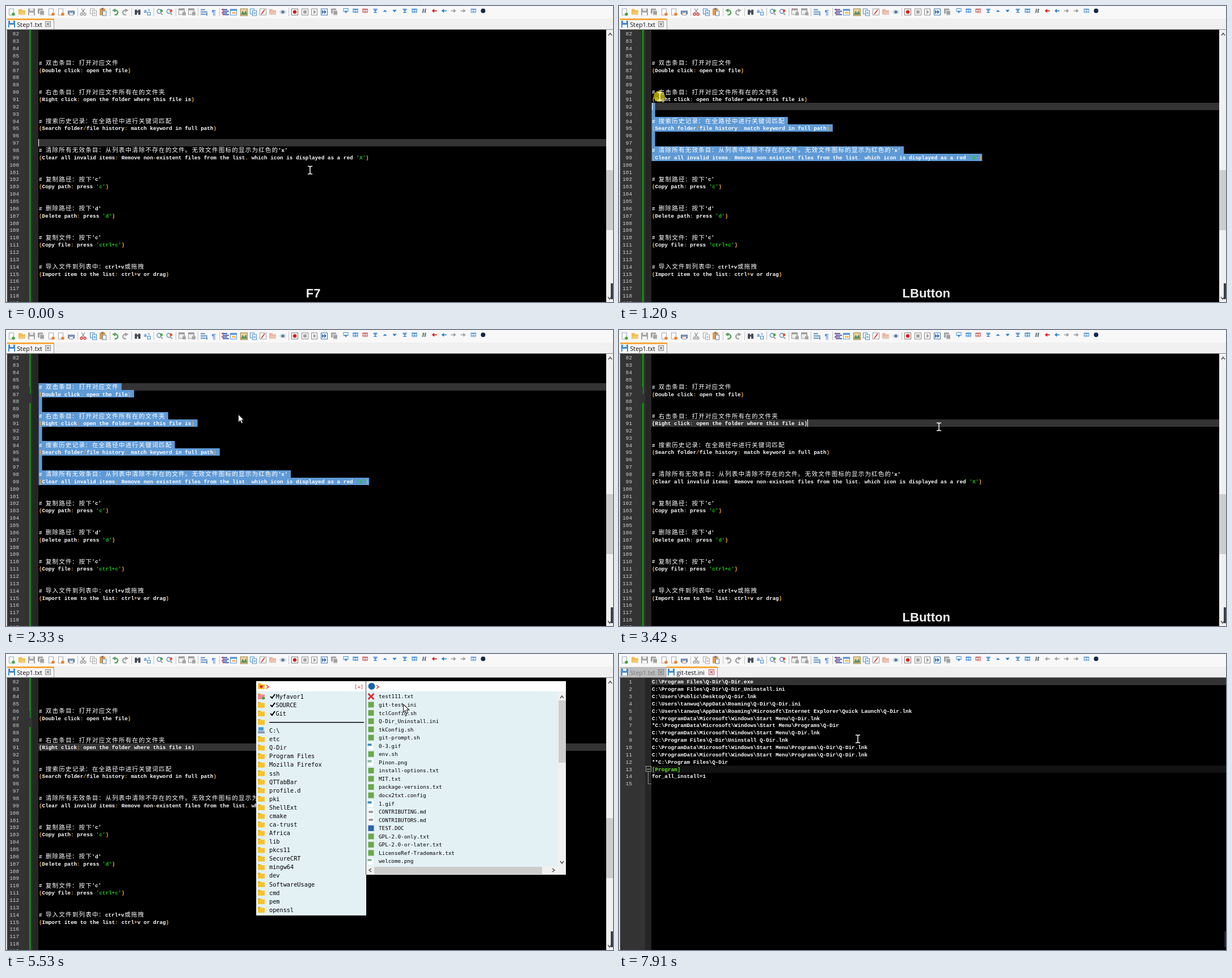
Write an HTML page with a canvas that moves like this. It is 1070 px wide and 523 px high and loops after 8000 ms.

```html
<!DOCTYPE html>
<html lang="en">
<head>
<meta charset="utf-8">
<title>Editor session</title>
<style>
html, body { margin: 0; width: 100%; height: 100%; overflow: hidden; background: #000; }
canvas { display: block; width: 1070px; height: 523px; }
</style>
</head>
<body>
<canvas id="stage" width="1070" height="523"></canvas>
<script>
const ctx = document.getElementById('stage').getContext('2d');
const LOOP = 8000, LEFT = 58, CHAR = 5.593, WIDE = 11.73, PITCH = 12.86;
const MONO = '9.32px "Liberation Mono", monospace';
const CJK = '500 10.6px "Noto Sans CJK SC", "Noto Sans CJK", sans-serif';
const UI = '"Open Sans", "Noto Sans", sans-serif';

const pairs = [
  ['# 双击条目：打开对应文件', '(Double click: open the file)'],
  ['# 右击条目：打开对应文件所有在的文件夹', '(Right click: open the folder where this file is)'],
  ['# 搜索历史记录：在全路径中进行关键词匹配', '(Search folder/file history: match keyword in full path)'],
  ["# 清除所有无效条目：从列表中清除不存在的文件。无效文件图标的显示为红色的'x'",
   "(Clear all invalid items: Remove non-existent files from the list. which icon is displayed as a red 'X')"],
  ["# 复制路径：按下'c'", "(Copy path: press 'c')"],
  ["# 删除路径：按下'd'", "(Delete path: press 'd')"],
  ["# 复制文件：按下'c'", "(Copy file: press 'ctrl+c')"],
  ['# 导入文件到列表中：ctrl+v或拖拽', '(Import item to the list: ctrl+v or drag)']
];
const notes = {};
pairs.forEach((pair, i) => pair.forEach((s, j) => { notes[86 + 4 * i + j] = s; }));

const menu = 'C:\\ProgramData\\Microsoft\\Windows\\Start Menu\\', home = 'C:\\Users\\tanwuq\\AppData\\Roaming\\';
const ini = [
  'C:\\Program Files\\Q-Dir\\Q-Dir.exe', 'C:\\Program Files\\Q-Dir\\Q-Dir_Uninstall.ini',
  'C:\\Users\\Public\\Desktop\\Q-Dir.lnk', home + 'Q-Dir\\Q-Dir.ini',
  home + 'Microsoft\\Internet Explorer\\Quick Launch\\Q-Dir.lnk', menu + 'Q-Dir.lnk',
  '*' + menu + 'Programs\\Q-Dir', menu + 'Q-Dir.lnk', '*C:\\Program Files\\Q-Dir\\Uninstall Q-Dir.lnk',
  menu + 'Programs\\Q-Dir\\Q-Dir.lnk', menu + 'Programs\\Q-Dir\\Q-Dir.lnk',
  '**C:\\Program Files\\Q-Dir', '[Program]', 'for_all_install=1', ''
];
const folders = ('Myfavor1|SOURCE|Git||C:\\|etc|Q-Dir|Program Files|Mozilla Firefox|ssh|QTTabBar|profile.d|pki|ShellExt|' +
  'cmake|ca-trust|Africa|lib|pkcs11|SecureCRT|mingw64|dev|SoftwareUsage|cmd|pem|openssl').split('|');
const files = ('test111.txt|git-test.ini|tclConfig.sh|Q-Dir_Uninstall.ini|tkConfig.sh|git-prompt.sh|0-3.gif|env.sh|Pinon.png|' +
  'install-options.txt|MIT.txt|package-versions.txt|docx2txt.config|1.gif|CONTRIBUTING.md|CONTRIBUTORS.md|TEST.DOC|' +
  'GPL-2.0-only.txt|GPL-2.0-or-later.txt|LicenseRef-Trademark.txt|welcome.png').split('|');

// time, x, y of the pointer
const path = [
  [70, 536, 290], [300, 640, 276], [520, 686, 268], [740, 650, 267], [820, 640, 267], [1000, 330, 215],
  [1130, 120, 177], [1200, 72, 160], [1470, 49, 99], [2000, 49, 99], [2330, 409, 149], [2560, 555, 172],
  [2680, 564, 171], [3600, 564, 171], [4020, 562, 128], [4700, 562, 128], [5150, 718, 95],
  [5450, 700, 86], [5590, 701, 91], [7230, 701, 91], [7360, 650, 98], [7500, 590, 108], [7850, 421, 150]
];
const labels = [
  [0, 'F7'], [740, 'LButton'], [1800, ''], [3220, 'LButton'], [3950, 'Ctrl + Alt + Space'],
  [5000, ''], [5880, 'LButton'], [5990, 'Double-Click'], [7030, '']
];

const within = (t, a, b) => t >= a && t < b;
const isWide = c => c >= '\u3000';
const widthOf = s => [...s].reduce((w, c) => w + (isWide(c) ? WIDE : CHAR), 0);

function rect(x, y, w, h, color) { ctx.fillStyle = color; ctx.fillRect(x, y, w, h); }
function frame(x, y, w, h, color, fill) {
  if (fill) rect(x, y, w, h, fill);
  ctx.strokeStyle = color; ctx.lineWidth = 1;
  ctx.strokeRect(x + .5, y + .5, w - 1, h - 1);
}
function line(color, width, ...p) {
  ctx.strokeStyle = color; ctx.lineWidth = width;
  ctx.beginPath();
  for (let i = 0; i < p.length; i += 2) ctx.lineTo(p[i], p[i + 1]);
  ctx.stroke();
}
function shape(color, ...p) {
  ctx.fillStyle = color;
  ctx.beginPath();
  for (let i = 0; i < p.length; i += 2) ctx.lineTo(p[i], p[i + 1]);
  ctx.closePath(); ctx.fill();
}
function disc(x, y, r, color) {
  ctx.fillStyle = color; ctx.beginPath(); ctx.arc(x, y, r, 0, 7); ctx.fill();
}
function ring(x, y, r, color, width = 1, from = 0, to = 7) {
  ctx.strokeStyle = color; ctx.lineWidth = width;
  ctx.beginPath(); ctx.arc(x, y, r, from, to); ctx.stroke();
}
function text(s, x, y, font, color, align = 'left') {
  ctx.font = font; ctx.fillStyle = color; ctx.textAlign = align; ctx.fillText(s, x, y);
}
function chevron(x, y, dx, dy, color = '#505050') {
  line(color, 1.5, x - 3 * dy - 2 * dx, y - 3 * dx - 2 * dy, x + 2 * dx, y + 2 * dy, x + 3 * dy - 2 * dx, y + 3 * dx - 2 * dy);
}

function pointerAt(t) {
  const i = path.findIndex(p => p[0] > t);
  if (i < 0) return path[path.length - 1].slice(1);
  if (i === 0) return path[0].slice(1);
  const [t0, x0, y0] = path[i - 1], [t1, x1, y1] = path[i], k = (t - t0) / (t1 - t0);
  return [x0 + (x1 - x0) * k, y0 + (y1 - y0) * k];
}

// Toolbar glyphs, drawn around (0, 0)
const glyph = {
  page(c) { frame(-5, -6, 9, 12, '#9aa6b2', '#fff'); disc(3, 4, 2.8, c); },
  folder(c) { rect(-6, -5, 6, 3, c); rect(-6, -3, 12, 8, c); shape('#fff3', -6, 5, -3, 0, 7, 0, 5, 5); },
  disk(c) { rect(-6, -6, 12, 12, c); rect(-3, -6, 6, 4, '#e8eef4'); rect(-4, 1, 8, 5, '#fff'); },
  disks(c) { rect(-6, -6, 9, 9, c); frame(-3, -3, 9, 9, '#fff', c); },
  print(c) { rect(-4, -6, 8, 5, '#fff'); frame(-6, -2, 12, 6, '#668', c); frame(-4, 1, 8, 5, '#889', '#fff'); },
  cut(c) { line('#889', 1.3, -3, -6, 3, 3); line('#889', 1.3, 3, -6, -3, 3); ring(-3, 4, 2, c, 1.5); ring(3, 4, 2, c, 1.5); },
  copy(c) { frame(-6, -6, 8, 10, c, '#fff'); frame(-2, -3, 8, 10, c, '#fff'); line(c, 1, 0, 1, 4, 1); line(c, 1, 0, 3, 4, 3); },
  paste(c) { rect(-6, -6, 10, 12, c); rect(-3, -7, 4, 3, '#777'); frame(-1, -2, 7, 9, '#5580b0', '#fff'); },
  undo(c) { ring(0, 1, 4, c, 2.4, -1.7, 2); shape(c, -6, -3, 0, -6, 0, 1); },
  redo(c) { ctx.scale(-1, 1); glyph.undo(c); },
  find(c) { rect(-5, -4, 4, 9, c); rect(1, -4, 4, 9, c); rect(-2, -2, 4, 3, c); },
  swap(c) { text('a', -6, 1, 'bold 9px "Liberation Sans", sans-serif', c); frame(0, 0, 6, 6, c); line(c, 1.3, 2, -5, 4, -2); },
  zoom(c) { ring(-1, -1, 3.6, '#6a9cc4', 1.6); line('#a98', 2, 2, 2, 5, 5); disc(3, -2, 2.4, c); },
  lock(c) { frame(-6, -6, 11, 11, '#999', '#f0f0f0'); rect(-6, -6, 11, 3, '#999'); rect(1, 1, 6, 5, c); ring(4, 1, 2, c); },
  wrap(c) { for (const y of [-4, 0, 4]) rect(-6, y - 1, y ? 8 : 12, 2, c); shape(c, 2, 4, 6, 1, 6, 7); },
  mark(c) { text('¶', 0, 5, 'bold 13px "Liberation Sans", sans-serif', c, 'center'); },
  indent(c) { for (const y of [-5, -2, 1, 4]) rect(y % 2 ? -5 : -2, y, 10, 1.6, c); rect(-3, -6, 1, 12, '#d44'); },
  tile(c) { frame(-6, -5, 12, 11, c, '#fff'); rect(-6, -5, 12, 3, c); rect(-3, 0, 7, 3, '#ffb84a'); },
  map(c) { frame(-6, -6, 13, 13, '#a88040', '#e8d8a0'); shape(c, -5, 5, -2, -2, 1, 2, 4, -3, 6, 5); },
  func(c) { frame(-6, -6, 12, 12, '#999', '#fff'); line(c, 2, -3, 4, 3, -4); },
  eye(c) { ctx.beginPath(); ctx.ellipse(0, 0, 6, 4, 0, 0, 7); ctx.fillStyle = '#cde'; ctx.fill(); disc(0, 0, 2.6, c); },
  rec(c) { frame(-6, -6, 12, 12, '#777', '#fff'); disc(0, 0, 3.3, c); },
  stop(c) { frame(-6, -6, 12, 12, '#888', '#fff'); rect(-3, -3, 6, 6, c); },
  play(c) { frame(-6, -6, 11, 12, '#888', '#fff'); shape(c, -2, -4, 3, 0, -2, 4); },
  fast(c) { frame(-6, -6, 12, 12, c, '#fff'); shape(c, -4, -4, 0, 0, -4, 4); shape(c, 0, -4, 4, 0, 0, 4); },
  grid(c) { frame(-5, -4, 10, 8, c, '#fff'); rect(-5, -4, 10, 2, c); line(c, 1, 0, -2, 0, 4); line(c, 1, -5, 1, 5, 1); },
  pin(c) { frame(-5, -5, 10, 7, c, '#fff'); shape(c, -3, 0, 3, 0, 0, 5); },
  up(c) { shape(c, -4, 2, 4, 2, 0, -2); },
  down(c) { shape(c, -4, -2, 4, -2, 0, 3); },
  both(c) { rect(-4, -4, 8, 1.5, c); shape(c, -4, -2, 4, -2, 0, 1); shape(c, -4, 4, 4, 4, 0, 1); },
  head(c) { text('H', 0, 4, 'italic bold 11px "Liberation Serif", serif', c, 'center'); },
  right(c) { rect(-5, -1, 6, 2, c); shape(c, 0, -4, 5, 0, 0, 4); },
  left(c) { ctx.scale(-1, 1); glyph.right(c); },
  ball(c) { disc(0, 0, 4.4, c); }
};
const GREY = '#a2a2a2', BLUE = '#2f80d0';
function toolbar(t, second) {
  const selected = within(t, 820, 3280), edit = selected ? BLUE : GREY;
  const nav = second ? GREY : BLUE;
  rect(0, 0, 1070, 22, '#f8f8f8');
  const tools = [
    ['page', 10, '#4a4'], ['folder', 28, '#f2bd4e'], ['disk', 45, GREY], ['disks', 62, GREY], ['page', 80, '#f08028'],
    ['page', 97, '#f08028'], ['print', 115, '#7aa4cc'], ['cut', 136, selected ? '#d03838' : GREY], ['copy', 154, edit],
    ['paste', 171, '#e09a48'], ['undo', 193, second ? GREY : '#5aa060'], ['redo', 210, GREY], ['find', 232, '#434c58'],
    ['swap', 249, BLUE], ['zoom', 271, '#48a848'], ['zoom', 288, '#e05038'], ['lock', 310, GREY], ['lock', 327, GREY],
    ['wrap', 349, '#5c90c4'], ['mark', 366, '#4c88dc'], ['indent', 385, '#2840a0'], ['tile', 401, '#5090d8'],
    ['map', 419, '#5a9060'], ['copy', 436, '#4888c8'], ['func', 453, '#d04838'], ['folder', 470, '#e8b8a4'],
    ['eye', 488, '#587890'], ['rec', 509, '#d82020'], ['stop', 527, GREY], ['play', 544, GREY], ['fast', 561, '#3870b0'],
    ['disks', 579, GREY], ['pin', 599, BLUE], ['grid', 616, BLUE], ['grid', 633, '#c05050'], ['both', 651, BLUE],
    ['up', 668, BLUE], ['down', 685, BLUE], ['both', 703, BLUE], ['grid', 720, BLUE], ['head', 737, '#385050'],
    ['left', 755, second ? GREY : '#d82020'], ['left', 772, nav], ['right', 789, GREY], ['right', 806, GREY],
    ['grid', 824, '#5090d0'], ['ball', 841, '#102848']
  ];
  for (const [kind, x, color] of tools) {
    const plugin = x > 590;
    ctx.save();
    ctx.translate(x, plugin ? 8.5 : 10.5);
    if (plugin) ctx.scale(.9, .9);
    glyph[kind](color);
    ctx.restore();
  }
  for (const x of [126, 183, 221, 260, 299, 338, 376, 498]) rect(x, 3, 1, 15, '#c4c4c4');
}

function tab(x, w, name, active) {
  rect(x, 23, w, 19, active ? '#f6f6f6' : '#bdbdbd');
  if (active) rect(x, 22, w, 3, '#faa83c');
  rect(x + w, 23, 1, 19, '#999');
  ctx.save(); ctx.translate(x + 8, 32); glyph.disk('#3f88cf'); ctx.restore();
  text(name, x + 17.5, 36.5, '10.7px ' + UI, active ? '#101010' : '#777');
  const cx = x + w - 10, close = active && x > 50 ? '#c05060' : '#808080';
  frame(cx - 5, 27, 10, 10, close);
  line(close, 1.4, cx - 2.5, 29.5, cx + 2.5, 34.5); line(close, 1.4, cx + 2.5, 29.5, cx - 2.5, 34.5);
}

// Latin runs flow on; each wide character sits centred in its own cell
function run(s, x, y, color) {
  for (const part of s.match(/[\u3000-\uffff]|[^\u3000-\uffff]+/g) || []) {
    if (!isWide(part)) text(part, x, y, 'bold ' + MONO, color);
    else if ('：。'.includes(part)) text(part, x, y + .5, CJK, color);
    else text(part, x + WIDE / 2, y + .5, CJK, color, 'center');
    x += widthOf(part);
  }
}
function note(s, y, brace) {
  if (s[0] === '#') return run(s, LEFT, y, '#fff');
  let x = LEFT;
  for (const part of s.match(/'[^']*'|[():\/.+-]|[^'():\/.+-]+/g)) {
    const color = part[0] === "'" ? '#18c818' : brace && /[()]/.test(part) ? '#fff'
      : /^[():\/.+-]$/.test(part) ? '#ffa838' : '#fff';
    run(part, x, y, color);
    x += widthOf(part);
  }
}

function gutter(first, count) {
  rect(0, 42, 46, 481, '#333');
  rect(46, 42, 11, 481, '#262626');
  rect(0, 42, 2, 481, '#dcdcdc');
  for (let i = 0; i < count; i++) text(first + i, 23, 52.2 + i * PITCH, MONO, '#d2d2d2', 'right');
}

function notesView(t) {
  const top = n => Math.floor(42.6 + (n - 82) * PITCH);
  let row = 97, caretX = 57.5, selFrom = 0;
  if (within(t, 740, 3280)) {
    const [px, py] = pointerAt(Math.min(t, 1610) - 70);
    row = Math.max(86, Math.min(99, Math.floor((py - 42.6) / PITCH) + 82));
    const end = LEFT + widthOf(notes[row] || '');
    caretX = Math.max(57.5, Math.min(end, LEFT + Math.round((px - LEFT) / CHAR) * CHAR));
    selFrom = row;
  } else if (t >= 3280) { row = 91; caretX = LEFT + widthOf(notes[91]); }

  rect(57, 42, 1001, 481, '#000');
  rect(57, top(row), 1001, 13, '#343434');
  gutter(82, 38);
  rect(41, 42, 2.5, 481, '#0aa00a');
  if (t >= 1540) { rect(40, 113, 4, 16, '#333'); rect(40, 101, 2, 12, '#333'); }
  if (selFrom) for (let n = selFrom; n <= 99; n++) {
    const x = n === selFrom ? caretX : 57.5;
    const end = LEFT + widthOf(notes[n] || '') + (n < 99 ? CHAR : .5);
    rect(x, top(n), end - x, 13, '#5f9ad6');
  }
  for (const n in notes) note(notes[n], 52.2 + (n - 82) * PITCH, t >= 3280 && +n === 91);
  const blink = t < 300 || within(t, 740, 1900) || within(t, 3280, 3810) || within(t, 6170, 6690);
  if (blink) rect(Math.floor(caretX), top(row), 1, 13, '#fff');

  rect(1058, 42, 12, 481, '#f0f0f0');
  rect(1058, 290, 12, 106, '#cdcdcd');
  chevron(1065, 50, 0, -1); chevron(1064, 516, 0, 1);
  rect(1066, 490, 4, 28, '#3a3f44');
}

function iniView(t) {
  rect(57, 42, 1013, 481, '#000');
  rect(57, 42, 1013, 13, '#333');
  rect(57, 197, 1013, 13, '#121212');
  gutter(1, 15);
  ini.forEach((s, i) => run(s, LEFT, 52.2 + i * PITCH, i === 12 ? '#66e81c' : '#fff'));
  frame(47, 198, 10, 10, '#a0a0a0', '#222');
  line('#c0c0c0', 1, 49, 203.5, 55, 203.5);
  line('#909090', 1, 51.5, 208, 51.5, 229.5, 57, 229.5);
  if (within(t, 6750, 7280)) rect(57, 43, 1, 12, '#fff');
  rect(1067, 490, 3, 28, '#222629');
}

function smallFolder(x, y, color = '#f8c22c') {
  rect(x - 6, y - 5, 5, 3, '#e0a018'); rect(x - 6, y - 3.5, 12, 8.5, color);
}
function fileIcon(name, x, y) {
  if (name === 'test111.txt') {
    line('#d82828', 2.6, x - 5, y - 5, x + 5, y + 5); line('#d82828', 2.6, x + 5, y - 5, x - 5, y + 5);
  } else if (/\.(gif|png)$/.test(name)) {
    rect(x - 5, y - 6, 9, 12, '#fff'); rect(x - 6, y - 4, 7, 4, name.endsWith('gif') ? '#3a90c8' : '#88b8a0');
  } else if (name.endsWith('.md')) {
    rect(x - 5, y - 6, 10, 12, '#fff'); text('MD', x, y + 2, 'bold 5px "Liberation Sans", sans-serif', '#444', 'center');
  } else rect(x - 5, y - 5, 10, 10, name.endsWith('DOC') ? '#2b62b0' : '#6ba84a');
}

function popup() {
  const red = '#e02828', mono = px => px + 'px "DejaVu Sans Mono", monospace';
  rect(441, 48, 194, 414, '#e3f1f5'); rect(441, 48, 193, 18, '#fff');
  smallFolder(450, 57); disc(448.8, 57, 1.8, red); disc(451.2, 57, 1.8, red); shape(red, 447, 58, 453, 58, 450, 61);
  chevron(461, 58, 1, 0, red);
  text('[+]', 614, 60.5, mono(9), red);
  folders.forEach((name, i) => {
    const y = 75 + i * 15.08;
    if (i === 4) { rect(445, y - 6, 9, 6, '#3f9ae0'); rect(444, y + 1, 12, 4, '#8a98a4'); }
    else smallFolder(450, y, i ? '#f8c22c' : '#f08890');
    if (i === 0) disc(454, y + 3, 2.5, '#38a848');
    if (i < 3) line('#000', 2, 466, y, 469, y + 3, 474, y - 4);
    if (i === 3) rect(464, 120, 167, 1.5, '#000');
    text(name, i < 3 ? 475.5 : 464, y + 3.8, mono(10.25), '#000');
  });
  rect(635, 48, 352, 342, '#e3f1f5'); rect(635, 48, 352, 18, '#fff'); rect(634, 48, 1, 342, '#555');
  disc(644.5, 57, 6, '#1764ae'); chevron(655, 58, 1, 0, red);
  files.forEach((name, i) => {
    const y = 75 + i * 14.55;
    fileIcon(name, 643.5, y);
    text(name, 657, y + 3.4, mono(9.28), '#000');
  });
  rect(973, 67, 14, 323, '#f0f0f0'); rect(635, 375, 352, 15, '#f0f0f0');
  rect(974, 82, 13, 110, '#cdcdcd'); rect(649, 376, 296, 13, '#cdcdcd');
  chevron(980, 76, 0, -1); chevron(980, 368, 0, 1); chevron(642, 382, -1, 0); chevron(965, 382, 1, 0);
}

function toast() {
  const edge = ctx.createLinearGradient(394, 0, 683, 0);
  edge.addColorStop(0, '#d0529a'); edge.addColorStop(.5, '#8a68b0'); edge.addColorStop(1, '#5284c4');
  ctx.beginPath(); ctx.roundRect(394, 239.5, 288.5, 57, 16);
  ctx.fillStyle = '#252838'; ctx.fill();
  ctx.strokeStyle = edge; ctx.lineWidth = 1.6; ctx.stroke();
  text('D:\\Program Files\\Git\\git-test.ini', 411.5, 274.5, '17.5px ' + UI, '#e4e6ee');
}

function pointer(t) {
  const [x, y] = pointerAt(t);
  if (within(t, 740, 1600) || within(t, 3220, 3340) || within(t, 5880, 6170)) disc(x - 1, y, 10, 'rgba(196,186,10,.82)');
  if (within(t, 2000, 2620) || within(t, 4220, 6050)) {
    const p = [0, 0, 0, 14, 3.2, 11, 5.5, 16, 8, 15, 5.8, 10, 10, 10].map((v, i) => v + (i % 2 ? y : x));
    shape('#fff', ...p);
    line('#222', 1.1, ...p, p[0], p[1]);
  } else {
    line('#fff', 1.5, x, y - 6, x, y + 6);
    for (const s of [-7, 7]) line('#fff', 1.4, x - 4, y + s, x - 1, y + s * .93, x + 1, y + s * .93, x + 4, y + s);
  }
}

function draw(t) {
  const second = t >= 6690;
  toolbar(t, second);
  rect(0, 22, 1070, 20, '#f0f0f0');
  tab(2, 82, 'Step1.txt', !second);
  if (second) tab(84, 89, 'git-test.ini', true);
  if (second) iniView(t); else notesView(t);
  rect(0, 41, 1070, 1, '#8a8a8a');
  if (within(t, 4220, 6050)) popup();
  if (within(t, 6050, 7640)) toast();
  const label = labels.filter(l => l[0] <= t).pop()[1];
  text(label, 541.7, 515, 'bold 22px "Liberation Sans", Arial, sans-serif', '#f0f0f0', 'center');
  pointer(t);
}

function tick(now) {
  draw(now % LOOP);
  requestAnimationFrame(tick);
}
draw(0);
requestAnimationFrame(tick);
</script>
</body>
</html>
```
